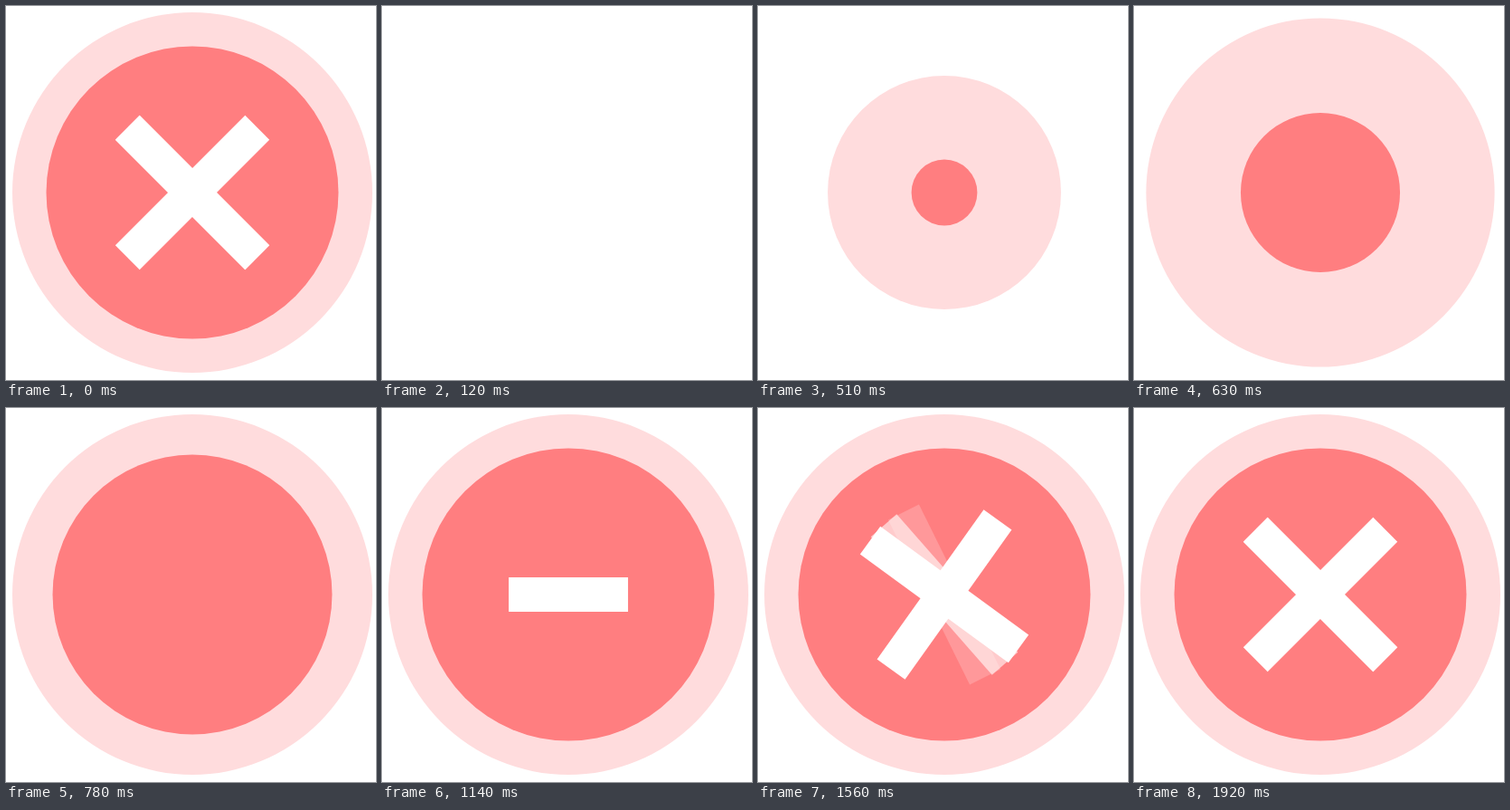
An HTML page with a canvas that plays this animation: 409 px wide and 413 px high, repeating every 2.25 s.

```html
<!DOCTYPE html>
<html lang="en">
<head>
<meta charset="utf-8">
<title>Error cross</title>
<style>
  html, body { margin: 0; width: 100%; height: 100%; overflow: hidden; background: #fff; }
  canvas { display: block; }
</style>
</head>
<body>
<canvas id="stage" width="409" height="413"></canvas>
<script>
const ctx = document.getElementById('stage').getContext('2d');
const LOOP = 2250, CENTER = 206;
const OUTER = 199, INNER = 161.5, BAR_LENGTH = 203, BAR_WIDTH = 38;

const progress = (t, start, end) => Math.min(1, Math.max(0, (t - start) / (end - start)));
const ease = (t, start, end) => {
  const p = progress(t, start, end);
  return p * p * (3 - 2 * p);
};
const softEase = p => 1 - (1 - p ** 1.7) ** 1.39;

// Swing from 0 to a peak angle, then settle back.
const swing = (t, start, top, end, peak, rest) =>
  peak * ease(t, start, top) + (rest - peak) * ease(t, top, end);
const shortSwing = t => swing(t, 1320, 1560, 1830, 54.5, 45);
const longSwing = t => swing(t, 1320, 1620, 1880, 160, 135);

function disc(radius, color, alpha = 1) {
  ctx.globalAlpha = alpha;
  ctx.fillStyle = color;
  ctx.beginPath();
  ctx.arc(0, 0, radius, 0, Math.PI * 2);
  ctx.fill();
}

function bar(length, degrees, alpha = 1) {
  ctx.save();
  ctx.rotate(-degrees * Math.PI / 180);
  ctx.globalAlpha = alpha;
  ctx.fillStyle = '#fff';
  ctx.fillRect(-length / 2, -BAR_WIDTH / 2, length, BAR_WIDTH);
  ctx.restore();
}

function draw(time) {
  // The finished cross holds across the loop point, then vanishes at once.
  const t = time < 120 ? LOOP : time;
  ctx.setTransform(1, 0, 0, 1, 0, 0);
  ctx.globalAlpha = 1;
  ctx.fillStyle = '#fff';
  ctx.fillRect(0, 0, 409, 413);
  ctx.translate(CENTER, CENTER);

  disc(OUTER * ease(t, 265, 675), '#ffdcdd');
  disc(INNER * softEase(progress(t, 350, 810)), '#ff7e80', progress(t, 350, 468));

  const length = BAR_LENGTH * ease(t, 895, 1305);
  if (t > 1320) {
    bar(length, longSwing(t - 44), 0.2);
    bar(length, longSwing(t - 22), 0.6);
  }
  bar(length, longSwing(t));
  bar(length, shortSwing(t));
}

const begin = performance.now();
function tick() {
  draw((performance.now() - begin) % LOOP);
  requestAnimationFrame(tick);
}
tick();
</script>
</body>
</html>
```
